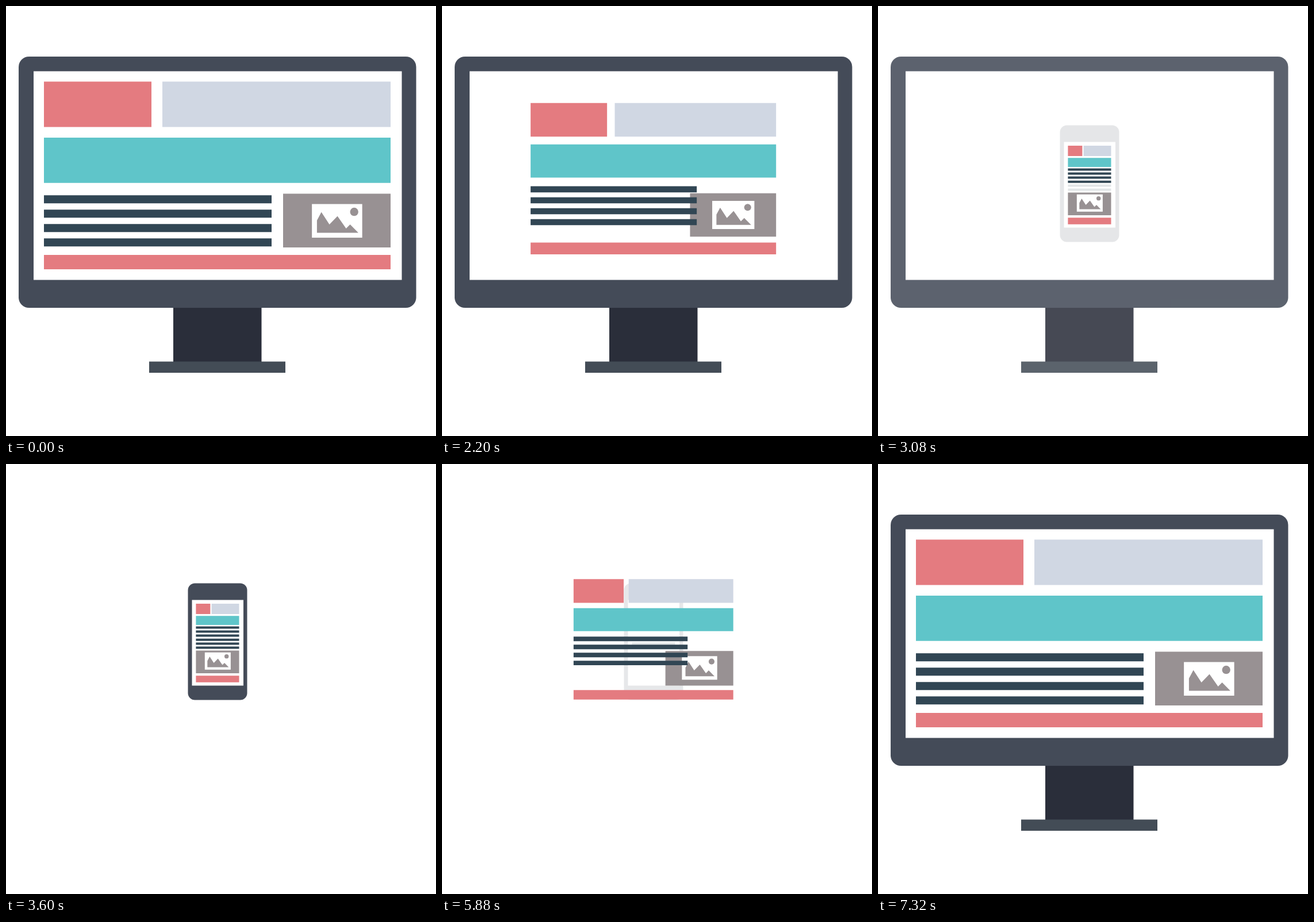
An HTML page that plays this animation: 748x748 px, repeating every 7.68 s.

```html
<!DOCTYPE html>
<html lang="en">
<head>
<meta charset="utf-8">
<title>Responsive layout</title>
<style>
  html, body { margin: 0; width: 100%; height: 100%; overflow: hidden; background: #fff; }
  svg { display: block; width: 100%; height: 100%; }
</style>
</head>
<body>
<svg viewBox="0 0 748 748">
  <g id="monitor">
    <rect x="291" y="524" width="153.5" height="95" fill="#2a2e3a"/>
    <rect x="249" y="618.5" width="237" height="19.5" fill="#434c56"/>
    <rect x="22" y="88" width="691.5" height="437" rx="18" fill="#444b58"/>
    <rect x="48" y="113.5" width="640.5" height="363" fill="#fff"/>
  </g>
  <g id="phone">
    <rect x="316.5" y="207.5" width="103" height="203" rx="12" fill="#444b58"/>
    <rect x="323.5" y="236.5" width="89.5" height="149" fill="#fff"/>
    <path d="M330.4 312.5h75.1m-75.1 7h75.1" stroke="#314654" stroke-width="3.8"/>
  </g>
  <g id="page">
    <path id="logo" fill="#e47b80"/>
    <path id="menu" fill="#d0d7e3"/>
    <path id="hero" fill="#5fc5c9"/>
    <path id="footer" fill="#e47b80"/>
    <path id="photo" fill="#989193"/>
    <g id="icon">
      <path d="M-43.75 -29.25h87.5v58.5h-87.5z" fill="#fff"/>
      <path d="M-35 -0.7L-27.3 -15.2L-13.3 6.3L0.7 -8.2L15.7 13.3L22.7 6.3L37 20.8H-35Z" fill="#989193"/>
      <circle cx="29.8" cy="-15.7" r="7.2" fill="#989193"/>
    </g>
    <path id="text" fill="#314654"/>
  </g>
</svg>
<script>
const LOOP = 7680, STEP = 40;
const $ = id => document.getElementById(id);

// Page measures: [on the monitor, on the phone]
const measures = {
  left: [66, 330.4], right: [669, 405.5],
  top: [131.5, 243], headHeight: [79, 18],
  logoWidth: [187, 25], gap: [19, 2.2],
  heroTop: [229, 264.3], heroHeight: [78.7, 15.7],
  textTop: [329.2, 282.4], textWidth: [396, 75.1], pitch: [25, 7.1],
  photoTop: [326.5, 324.5], photoWidth: [187, 75.1], photoHeight: [93.5, 39.5],
  iconY: [373.75, 342.75], iconScale: [1, 0.515],
  footTop: [433, 368.3], footHeight: [25, 11.4]
};

const ramp = (t, from, to) => Math.min(1, Math.max(0, (t - from) / (to - from)));
const box = (x, y, w, h) => `M${x} ${y}h${w}v${h}h${-w}z`;
const shape = (id, ...size) => $(id).setAttribute('d', box(...size));

function drawPage(p) {
  const m = {};
  for (const key in measures) {
    const [wide, slim] = measures[key];
    m[key] = wide + (slim - wide) * p;
  }
  const width = m.right - m.left;
  const menuX = m.left + m.logoWidth + m.gap;
  const photoX = m.right - m.photoWidth;

  shape('logo', m.left, m.top, m.logoWidth, m.headHeight);
  shape('menu', menuX, m.top, m.right - menuX, m.headHeight);
  shape('hero', m.left, m.heroTop, width, m.heroHeight);
  shape('footer', m.left, m.footTop, width, m.footHeight);
  shape('photo', photoX, m.photoTop, m.photoWidth, m.photoHeight);
  $('icon').setAttribute('transform',
    `translate(${photoX + m.photoWidth / 2 + 0.4} ${m.iconY}) scale(${m.iconScale})`);

  let lines = '';
  for (let i = 0; i < 4; i++) {
    lines += box(m.left, m.textTop + i * m.pitch, m.textWidth, m.pitch * 0.56);
  }
  $('text').setAttribute('d', lines);
}

function draw(t) {
  const swap = ramp(t, 3000, 3600);
  $('monitor').setAttribute('opacity', 1 - swap + ramp(t, 6680, 7300));
  $('phone').setAttribute('opacity', swap - ramp(t, 5400, 5950));
  drawPage(ramp(t, 1800, 3000) - ramp(t, 5400, 6650));
}

const start = performance.now();
function tick() {
  const t = (performance.now() - start) % LOOP;
  draw(Math.floor(t / STEP) * STEP);
  requestAnimationFrame(tick);
}
tick();
</script>
</body>
</html>
```
